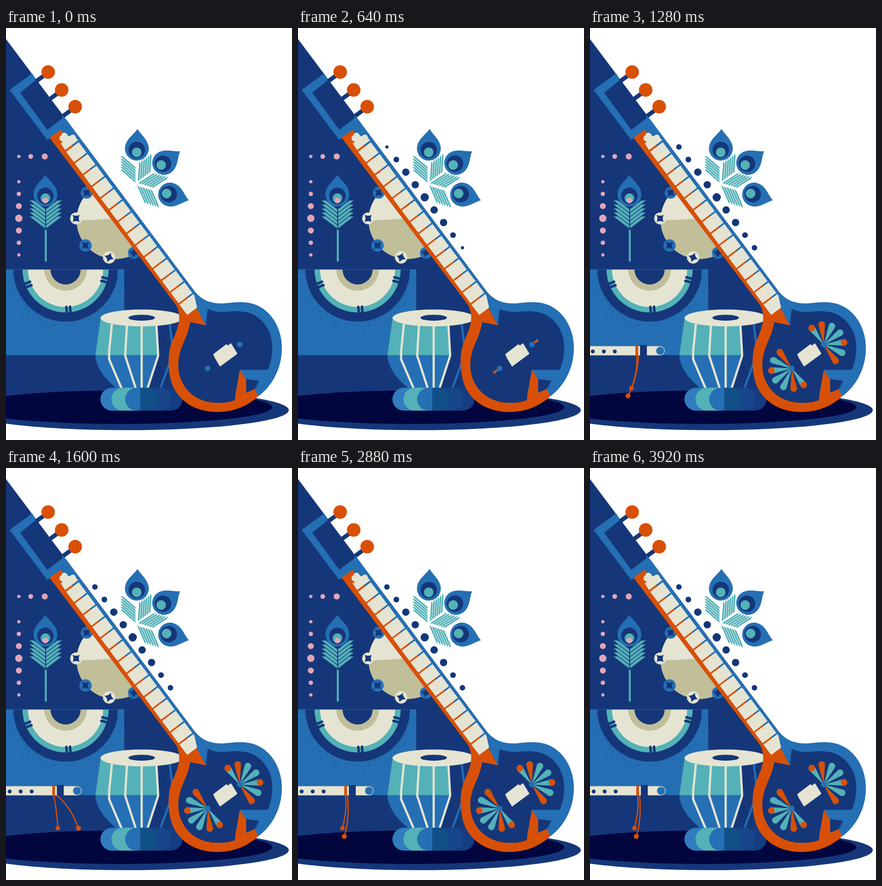
An HTML page that plays this animation: 624 px wide and 898 px high, repeating every 4000 ms.

```html
<!DOCTYPE html>
<html lang="en">
<head>
<meta charset="utf-8">
<title>Sitar and tabla</title>
<style>
html, body { margin: 0; width: 100%; height: 100%; overflow: hidden; background: #fff; }
svg { display: block; width: 624px; height: 898px; }
</style>
</head>
<body>
<svg id="stage" viewBox="0 0 624 898"></svg>
<script>
const navy = '#15377a', blue = '#256fb4', orange = '#d85007', teal = '#53b1b7',
  cream = '#e5e4d2', tan = '#c1be9a', dark = '#02063f', pink = '#e2a5b7';

const path = (d, fill) => `<path d="${d}" fill="${fill}"/>`;
const line = (d, color, w, cap = 'butt') =>
  `<path d="${d}" fill="none" stroke="${color}" stroke-width="${w}" stroke-linecap="${cap}" stroke-linejoin="round"/>`;
const dot = (x, y, r, fill) => `<circle cx="${x}" cy="${y}" r="${r}" fill="${fill}"/>`;
const oval = (x, y, rx, ry, fill) => `<ellipse cx="${x}" cy="${y}" rx="${rx}" ry="${ry}" fill="${fill}"/>`;
const rect = (x, y, w, h, fill, r = 0) =>
  `<rect x="${x}" y="${y}" width="${w}" height="${h}" rx="${r}" fill="${fill}"/>`;
const group = (transform, body) => `<g transform="${transform}">${body}</g>`;
const repeat = (n, make) => Array.from({ length: n }, (_, i) => make(i)).join('');

let seed = 7;
const random = () => (seed = seed * 16807 % 2147483647) / 2147483647;

function drum() {
  const half = (r, fill) => path(`M${130 - r} 526A${r} ${r} 0 0 0 ${130 + r} 526Z`, fill);
  const speckles = repeat(360, () => {
    const a = random() * Math.PI, r = 113 + 36 * random() ** 2;
    const x = 130 + r * Math.cos(a), y = 526 + r * Math.sin(a);
    return x > 0 && x < 257 ? dot(x.toFixed(1), y.toFixed(1), 0.6, navy) : '';
  });
  const ticks = [86, 158, 15].map(a => group(`translate(130 526) rotate(${a})`,
    line('M82 -4H93M82 4H93', navy, 5.5, 'round'))).join('');
  return rect(0, 526, 258, 187, blue) + speckles +
    half(114, navy) + half(94, teal) + half(82, cream) + half(46.5, tan) + half(33, navy) +
    ticks + line('M0 526.3H244', blue, 0.8);
}

const plume = (x, y, angle) => group(`translate(${x} ${y}) rotate(${angle})`,
  path('M0 -43C8 -30 26 -19 26 0A26 26 0 0 1 -26 0C-26 -19 -8 -30 0 -43Z', blue) +
  dot(0, 3, 18, navy) + dot(0, 8, 10.5, teal));

// Slanted barbs on the left side of a spine, with flat tips.
const barbs = (n, step, thick, dx, dy) => repeat(n, i =>
  path(`M0 ${i * step}v${thick}l${-dx} ${-dy}h${thick * dx / dy}Z`, teal));

function leftFeather() {
  const side = group('translate(-1 0)', barbs(5, 8.7, 7, 34, 26));
  return group('translate(86.5 395)', side + group('scale(-1 1)', side)) +
    rect(84.7, 440, 4.2, 69, teal) + plume(86, 363, 0) + dot(86, 376, 6, pink);
}

function rightFeathers() {
  const side = barbs(6, 5.9, 4.5, 33, 28);
  return group('translate(282.5 303)', side) +
    group('translate(315 314) rotate(54)', side) +
    group('translate(321 348) rotate(107)', side) +
    group('translate(319 354) rotate(107) scale(-1 1)', side) +
    plume(285.5, 263, 2) + plume(345, 294, 54) + plume(358, 363, 107);
}

function tambourine() {
  const jingle = (x, y, r, fill, a) => dot(x, y, r, fill) +
    group(`translate(${x} ${y}) rotate(${a})`,
      path('M0 -11Q2.5 -2.5 11 0Q2.5 2.5 0 11Q-2.5 2.5 -11 0Q-2.5 -2.5 0 -11Z', navy));
  return `<clipPath id="besideNeck"><path d="M0 24L0 605H372L95 239Z"/></clipPath>
    <clipPath id="skin"><circle cx="239" cy="418.5" r="85"/></clipPath>
    <g clip-path="url(#besideNeck)"><g clip-path="url(#skin)">` +
    rect(150, 330, 180, 180, cream) + path('M150 420L330 411V510H150Z', tan) + '</g>' +
    jingle(176, 359, 13, blue, 40) + jingle(153, 415, 13, cream, 45) +
    jingle(173.5, 474, 13.5, blue, 45) + jingle(225, 500, 13.5, cream, 20) +
    jingle(279, 490, 13, blue, 10) + '</g>';
}

function tabla() {
  return path('M206 636L195 713H331L328 640Z', teal) +
    path('M195 713C197 745 222 772 248 790H309L331 713Z', blue) +
    line('M357 643L363 692L362 716L337 785', blue, 4.5) +
    line('M231 645L225 705V722L252 785M264 645L260 714L283 785M296 645V785M328 645L332 714L309 785', cream, 4.8) +
    oval(296, 632, 90, 18.5, cream) + oval(296, 631.5, 29, 6.5, navy) +
    rect(280, 784, 105, 50, '#143d82', 25) + rect(270, 784, 91, 50, '#17468b', 25) +
    rect(260, 784, 70, 50, '#115087', 25) +
    path('M293 784H231A25 25 0 0 0 231 834H293Z', '#307cbe') +
    path('M293 784H255A25 25 0 0 0 255 834H293Z', teal) +
    path('M293 784H285A25 25 0 0 0 285 834H293Z', blue);
}

function neck() {
  const pegs = [[92, 96], [121.5, 135], [151, 171.5]].map(([x, y]) =>
    line(`M${x - 26} ${y + 20}L${x} ${y + 1}`, navy, 9) + dot(x, y, 14.8, orange)).join('');
  const frets = repeat(14, i => {
    const w = 34.5 + 0.25 * i;
    return group(`translate(${153.5 + 19.12 * i} ${270.7 + 25.54 * i}) rotate(53.2)`,
      rect(-14.2, -w / 2, 28.4, w, cream));
  });
  return path('M57 99L8 135L90 244L138 208L124 190L124 196L90 222L31 141L66 113Z', blue) +
    path('M119 222L124 190L408 570L440 612L418 614Z', blue) +
    path('M95 239L119 222L418 614L436 648L402 641L372 605Z', orange) +
    path('M129 266L119 251C125 250 124 247 120 246C115 243 116 235 121 234C122 227 130 227 133 231C135 235 138 238 141 234C146 231 152 233 152 238L157 245Z', cream) +
    frets + pegs;
}

function gourd() {
  const inner = 'C488 816 475 817 462 817C412 817 376 782 376 735C376 695 395 682 402 641L436 648';
  return path('M408 570C426 592 444 602 478 600C495 598 508 597 520 598C568 600 602 645 602 697C602 740 582 780 550 803L510 800L402 641L436 648L418 614Z', blue) +
    path('M440 612C455 619 468 620 485 618C497 617 506 617 515 618C552 620 581 655 581 695C581 715 577 732 571 745H510L499 811' + inner + 'Z', navy) +
    path('M524 765L553 769L543 787L524 795Z', navy) +
    path('M372 605C386 635 372 660 362 685C350 715 354 760 366 785C385 820 420 837 462 837C497 837 527 824 550 803L543 787L524 795V766L510 745L499 811' + inner + 'L396 628Z', orange) +
    path('M452 711L481 689L484 692L491 687L505 710L467 738L456 720Z', cream);
}

const pinkDots = [[28, 280, 3.6], [54, 280, 5.2], [84.5, 280, 6.6]]
  .concat([3.6, 4.8, 6.5, 8, 6.5, 4.8, 3.6].map((r, i) => [28, 335 + i * 26.6, r]))
  .map(([x, y, r]) => dot(x, y, r, pink)).join('');

document.getElementById('stage').innerHTML =
  path('M0 24L440 612L400 820L0 850Z', navy) + drum() +
  oval(262, 833, 355, 43.5, navy) + oval(247, 826.5, 334, 36.5, dark) +
  pinkDots + leftFeather() + rightFeathers() + tambourine() +
  '<g id="flute"></g>' + tabla() + neck() + gourd() +
  '<g id="fans"></g><g id="beads"></g>' + dot(510, 690, 6, blue) + dot(440, 742, 6, blue);

const clamp = x => Math.max(0, Math.min(1, x));
const ease = x => x < 0.5 ? 4 * x ** 3 : 1 - 4 * (1 - x) ** 3;
const show = (id, body) => { document.getElementById(id).innerHTML = body; };

// Tassel swing: trails while sliding, overshoots, settles.
const swingKeys = [[600, 0], [1100, -0.8], [1600, 1], [1950, -0.25], [2160, 0]];
function swingAt(t) {
  for (let i = 1; i < swingKeys.length; i++) {
    const [t0, a] = swingKeys[i - 1], [t1, b] = swingKeys[i];
    if (t >= t0 && t < t1) return a + (b - a) * (1 - Math.cos(Math.PI * (t - t0) / (t1 - t0))) / 2;
  }
  return 0;
}

function flute(t) {
  const s = swingAt(t), x1 = 97 + 16 * s, x2 = 101 + 57 * s, y2 = 803 - 18 * s * s;
  return group(`translate(${-170 * (1 - ease(clamp((t - 592) / 800)))} 0)`,
    line(`M103.5 712Q${108 + 3 * s} 745 ${x1} 785M108 712Q${113 + 27 * s} ${765 - 30 * s * s} ${x2} ${y2}`, orange, 2.6) +
    dot(x1, 785, 5, orange) + dot(x2, y2, 5.5, orange) +
    rect(-60, 693.5, 225, 20, cream, 10) + dot(155, 703.5, 8.8, blue) +
    rect(111, 691, 15, 23, navy) + rect(101, 693, 6, 21, orange) +
    repeat(3, i => dot(8 + 24 * i, 705, 4.3, navy)));
}

function fans(t) {
  const spread = ease(clamp((t - 580) / 640)), size = clamp((t - 560) / 240);
  const petals = repeat(7, i => group(`rotate(${-36 + 30 * (i - 3) * spread})`,
    path('M0 0L44 -7.2A7.2 7.2 0 0 1 44 7.2Z', i === 1 || i === 6 ? orange : teal) +
    (i % 4 ? '' : dot(44.5, 0, 7.2, orange))));
  return size ? group(`translate(510 690) scale(${size})`, petals) +
    group(`translate(440 742) rotate(180) scale(${size})`, petals) : '';
}

const beads = t => repeat(9, i => {
  const k = Math.abs(i - 4);
  return dot(194 + 20.6 * i, 259.3 + 27.45 * i,
    [9, 8, 8, 6.2, 6][k] * clamp((t - 20 - 120 * k) / 240), navy);
});

function frame(now) {
  const t = Math.floor(now % 4000 / 80) * 80;
  show('flute', flute(t));
  show('fans', fans(t));
  show('beads', beads(t));
  requestAnimationFrame(frame);
}
frame(0);
</script>
</body>
</html>
```
